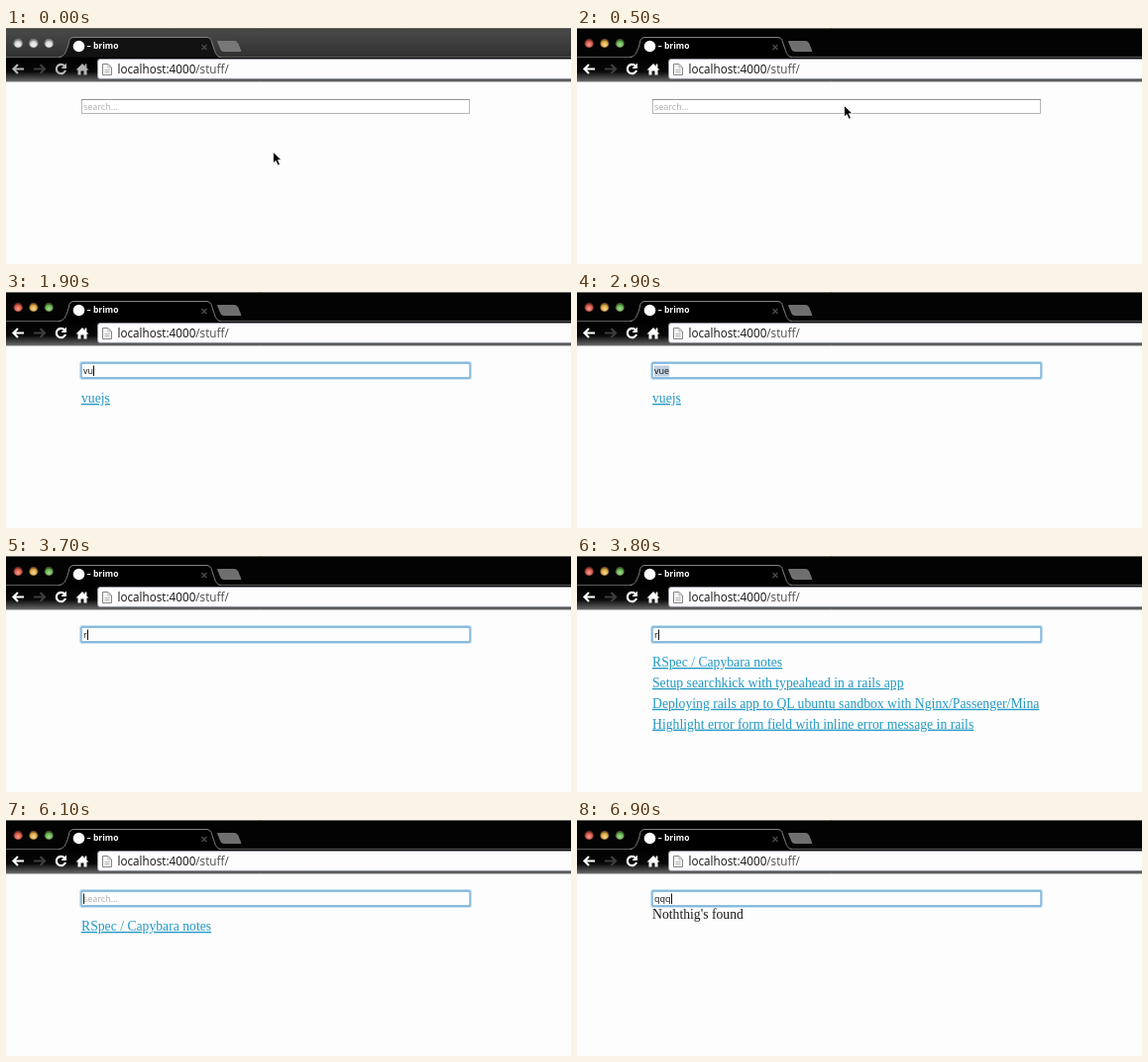
An HTML page for the animation above (7100 ms loop, 570 by 239 pixels).

```html
<!DOCTYPE html>
<html lang="en">
<head>
<meta charset="utf-8">
<title>Live search</title>
<style>
  html, body { margin: 0; width: 100%; height: 100%; overflow: hidden; background: #fefdfe; }
  svg { display: block; width: 570px; height: 239px; }
  text { white-space: pre; }
  .ui { font-family: "Open Sans", "Noto Sans", sans-serif; font-weight: 500; }
  .body { font: 13.7px "Liberation Serif", "Noto Serif", serif; }
  .link { fill: #2299c4; text-decoration: underline; }
</style>
</head>
<body>
<svg viewBox="0 0 570 239" xmlns="http://www.w3.org/2000/svg">
  <defs>
    <linearGradient id="stripOff" x2="0" y2="1">
      <stop offset="0" stop-color="#3a3a3a"/><stop offset=".1" stop-color="#484848"/>
      <stop offset="1" stop-color="#303030"/>
    </linearGradient>
    <linearGradient id="bar" x2="0" y2="1">
      <stop offset="0" stop-color="#000"/><stop offset=".6" stop-color="#080808"/>
      <stop offset="1" stop-color="#666"/>
    </linearGradient>
    <radialGradient id="shine" cy=".65">
      <stop offset="0" stop-color="#fff" stop-opacity=".5"/>
      <stop offset=".55" stop-color="#fff" stop-opacity=".12"/>
      <stop offset="1" stop-color="#000" stop-opacity=".35"/>
    </radialGradient>
  </defs>

  <rect width="570" height="239" fill="#fefdfe"/>

  <!-- window frame -->
  <rect id="strip" width="570" height="30"/>
  <path d="M0 .5H570" stroke="#5c5c5c"/>
  <rect y="29" width="570" height="25" fill="url(#bar)"/>
  <path d="M0 54.500H570" stroke="#b4b4b4"/>
  <path d="M0 29.500H56M214 29.500H570" stroke="#5e5e5e"/>
  <path id="tab" d="M53 29.500C59 29 60 25 62 20L64 12.500Q65 9.500 68 9.500H203Q206 9.500 207 12.500L209.500 20C211.500 26 212.500 29 217 29.500" stroke="#808080"/>
  <path id="newTab" d="M213.500 13.500H230.500Q232.500 13.500 233.500 15L237 23.500H220Q218 23.500 217 22Z" stroke="#8a8a8a" stroke-width=".7"/>
  <g id="lights" stroke-width=".7">
    <circle cx="12.200" cy="15.500" r="4.400"/>
    <circle cx="27.800" cy="15.500" r="4.400"/>
    <circle cx="43.300" cy="15.500" r="4.400"/>
  </g>
  <g fill="url(#shine)">
    <circle cx="12.200" cy="15.500" r="4.400"/>
    <circle cx="27.800" cy="15.500" r="4.400"/>
    <circle cx="43.300" cy="15.500" r="4.400"/>
  </g>
  <circle cx="73.500" cy="18.500" r="5.800" fill="#fff"/>
  <text class="ui" x="81.500" y="21.400" font-size="8.500" style="font-weight: 700" fill="#fff">– brimo</text>
  <path d="M197.500 17l5 5m0-5l-5 5" stroke="#4b4b4b" stroke-width="1.400"/>

  <!-- toolbar -->
  <g id="icons" fill="none" stroke-width="2.200">
    <path d="M18 41.500H8M12 37L7.500 41.500L12 46"/>
    <path d="M59 38.300A4.700 4.700 0 1 0 60 43"/>
    <path d="M61 35.500V41H55.500Z" stroke="none"/>
    <path d="M70.500 42.500L77 36L83.500 42.500H81.500V47.500H78.500V43.500H75.500V47.500H72.500V42.500Z" stroke="none"/>
    <path d="M80.500 36.500V40" stroke-width="1.800"/>
  </g>
  <path d="M28 41.500H38M34.500 37L39 41.500L34.500 46" fill="none" stroke="#3d3d3d" stroke-width="2.200"/>
  <path d="M572 31.500H95Q92.500 31.500 92.500 34V49Q92.500 51.500 95 51.500H572Z" fill="#fefdfe" stroke="#8f949b"/>
  <path d="M97.500 36.500H103L106.500 40V47.500H97.500Z" fill="#f5f5f5" stroke="#858585"/>
  <path d="M103 36.500V40H106.500M99.500 42.500h5M99.500 44.500h5" fill="none" stroke="#a5a5a5" stroke-width=".8"/>
  <text class="ui" x="112.500" y="45.800" font-size="11.700" fill="#111">localhost:4000<tspan fill="#4a4a4a">/stuff/</tspan></text>

  <!-- search field -->
  <g id="glow" fill="none">
    <rect x="75" y="71" width="394" height="17" rx="2" stroke="#c6dff1" stroke-width="2"/>
    <rect x="76" y="72" width="392" height="15" rx="1" stroke="#6fabd8" stroke-width="1.300"/>
  </g>
  <g id="plain">
    <rect x="76.500" y="72.500" width="391" height="14" fill="#fff" stroke="#b7b7bb"/>
    <path d="M76 72.500H468" stroke="#929296"/>
  </g>
  <rect id="mark" x="78" y="74.500" height="11" fill="#bfcfe0"/>
  <text id="query" class="ui" x="78" y="82.800" font-size="9"></text>
  <rect id="caret" y="74.500" width="1" height="10.500" fill="#111"/>

  <g id="results" class="body"></g>
  <text id="empty" class="body" x="76" y="100" fill="#1c1c1c">Noththig's found</text>

  <path id="pointer" d="M0 0V11.500L2.700 9L4.800 13.700L6.900 12.800L4.900 8.200H8.500Z" fill="#000" stroke="#fff" stroke-width=".8"/>
</svg>
<script>
const LOOP = 7100, STEP = 100, BLINK = 500;
const $ = id => document.getElementById(id);
const show = (node, on) => node.setAttribute("visibility", on ? "visible" : "hidden");

const RSPEC = "RSpec / Capybara notes";
const RAILS = [
  RSPEC,
  "Setup searchkick with typeahead in a rails app",
  "Deploying rails app to QL ubuntu sandbox with Nginx/Passenger/Mina",
  "Highlight error form field with inline error message in rails"
];

// [time, typed text, selected]
const typing = [
  [0, ""], [900, ""], [1600, "v"], [1900, "vu"], [2400, "vue"], [2900, "vue", true],
  [3200, ""], [3700, "r"], [4700, "rs"], [4900, "rsp"], [5900, "rsp", true],
  [6100, ""], [6500, "q"], [6700, "qq"], [6900, "qqq"]
];

// [time, titles]; null means the "not found" line
const lists = [
  [0, []], [1700, ["vuejs"]], [3300, []], [3800, RAILS],
  [4800, [RSPEC]], [6200, []], [6600, null]
];

const at = (track, t) => track.filter(k => k[0] <= t).pop();

const rows = RAILS.map((_, i) => {
  const row = document.createElementNS("http://www.w3.org/2000/svg", "text");
  row.setAttribute("class", "link");
  row.setAttribute("x", 76);
  row.setAttribute("y", 112 + i * 20.9);
  return $("results").appendChild(row);
});

function drawWindow(active) {
  const ink = active ? "#fff" : "#b5b5b5";
  const lamps = active ? ["#e2513f", "#e5ac39", "#5fb445"] : ["#dedede", "#dedede", "#dedede"];
  $("strip").setAttribute("fill", active ? "#030303" : "url(#stripOff)");
  $("tab").setAttribute("fill", active ? "#000" : "#121212");
  $("newTab").setAttribute("fill", active ? "#6e6e6e" : "#777");
  $("icons").setAttribute("stroke", ink);
  for (const icon of $("icons").children) {
    if (icon.getAttribute("stroke") === "none") icon.setAttribute("fill", ink);
  }
  [...$("lights").children].forEach((lamp, i) => lamp.setAttribute("fill", lamps[i]));
  $("lights").setAttribute("stroke", active ? "#47302a" : "#8b8b8b");
}

function drawPointer(t) {
  const p = Math.min(1, t / 500);
  const y = 125.5 - 47 * p * p * (3 - 2 * p);
  $("pointer").setAttribute("transform", `translate(269.500 ${y})`);
  show($("pointer"), t < 700);
}

function drawField(t) {
  const [since, typed, selected] = at(typing, t);
  const focused = t >= 900;
  show($("glow"), focused);
  show($("plain"), !focused);

  const query = $("query");
  query.textContent = typed || "search...";
  query.setAttribute("fill", typed ? "#111" : "#ababab");
  const width = typed ? query.getComputedTextLength() : 0;

  $("mark").setAttribute("width", width);
  show($("mark"), selected);
  $("caret").setAttribute("x", Math.round(78 + width));
  show($("caret"), focused && !selected && (t - since) % (2 * BLINK) < BLINK);
}

function drawResults(t) {
  const titles = at(lists, t)[1];
  show($("empty"), !titles);
  rows.forEach((row, i) => row.textContent = titles && titles[i] || "");
}

function draw(time) {
  const t = Math.floor(time % LOOP / STEP) * STEP;
  drawWindow(t >= 100);
  drawPointer(t);
  drawField(t);
  drawResults(t);
}

const start = performance.now();
function tick() {
  draw(performance.now() - start);
  requestAnimationFrame(tick);
}
tick();
</script>
</body>
</html>
```
